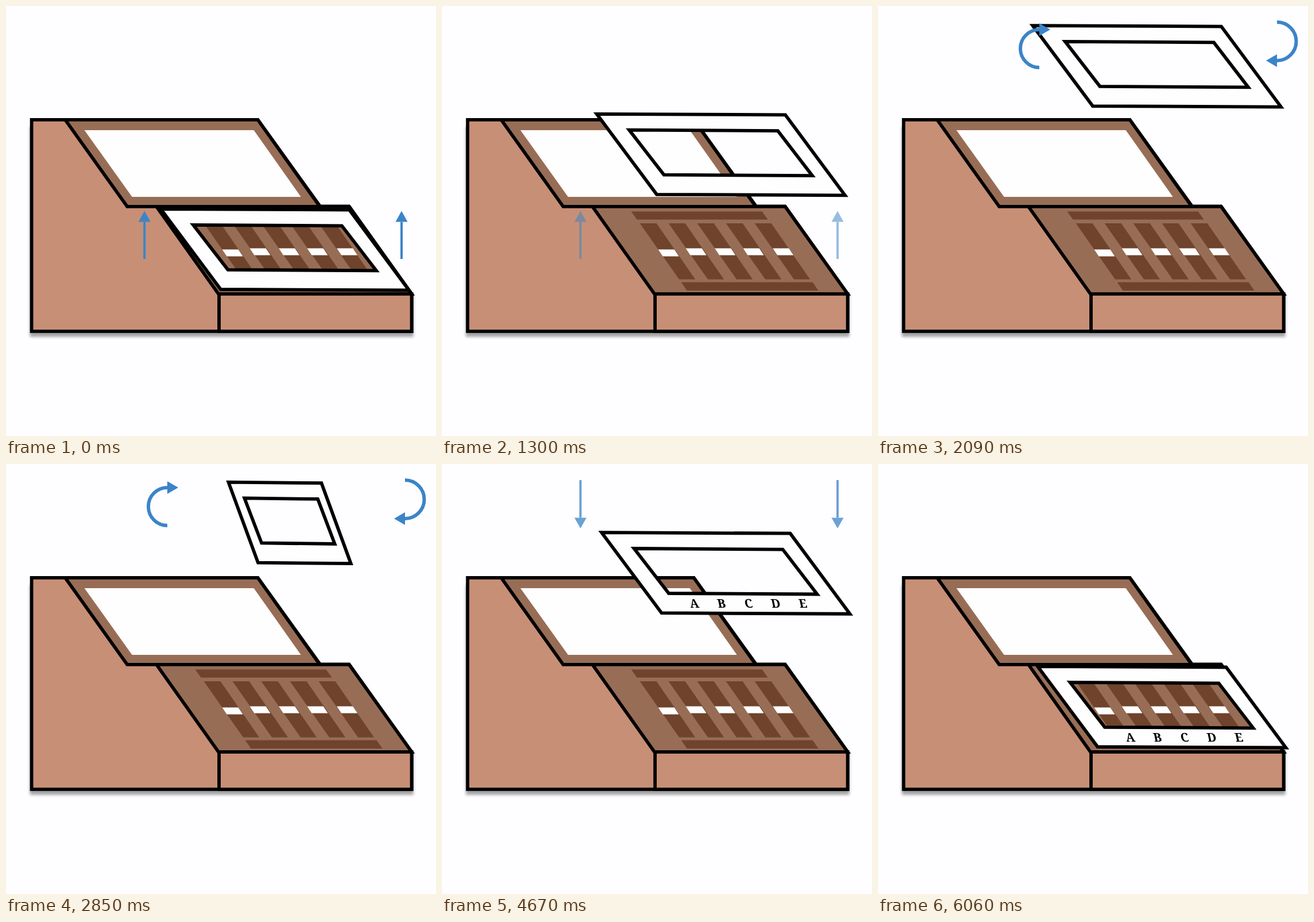
Animation, 749 px wide and 748 px high, one loop 6120 ms. Source, as an HTML page:

```html
<!DOCTYPE html>
<html lang="en">
<head>
<meta charset="utf-8">
<title>Reversible keyboard frame</title>
<style>
  html, body { margin: 0; width: 100%; height: 100%; overflow: hidden; background: #fefdff; }
  svg { display: block; width: 100vw; height: 100vh; }
  .line { stroke: #000; stroke-width: 5.8; stroke-miterlimit: 10; }
  .arrow path { fill: none; stroke: #3b84c8; }
  .arrow polygon { fill: #3b84c8; }
  text { font: bold 21px "Noto Serif", serif; text-anchor: middle; }
</style>
</head>
<body>
<svg viewBox="0 0 749 748" preserveAspectRatio="none">
  <defs>
    <filter id="soft" x="-5%" y="-5%" width="110%" height="115%"><feGaussianBlur stdDeviation="2.5"/></filter>
  </defs>
  <rect width="749" height="748" fill="#fefdff"/>
  <g transform="translate(-.4 .4)">
    <path d="M42 210H120L371 501H710V575H42Z" fill="#000" opacity=".36" filter="url(#soft)"/>
    <path class="line" fill="#c78f76" d="M45 197.500H439L547.500 348H598L707 500.500V565.500H45Z"/>
    <path class="line" fill="#986d56" d="M103.500 197.500H439L547 348.500H211.500Z"/>
    <path fill="#fefefe" d="M137 215.500H432L514 331.500H220Z"/>
    <path class="line" fill="#986d56" d="M262.500 348.500H598L707 500.500H370.500Z"/>
    <path fill="#6f432c" d="M330 357H558L568 371H340ZM417 480H646L656 494.500H427Z"/>
    <g id="slots"></g>
    <path class="line" fill="#c78f76" d="M371.500 500.500H707V565.500H371.500Z"/>
  </g>
  <g id="frame">
    <path id="panel" class="line" fill="#fefefe" fill-rule="evenodd"/>
    <g id="letters"></g>
  </g>
  <g id="lift" class="arrow"></g>
  <g id="turn" class="arrow">
    <path stroke-width="6" d="M281 107A33 33 0 0 1 281 41"/>
    <polygon points="281,30 281,52 300,41"/>
    <path stroke-width="6" d="M695 28A33.500 33.500 0 0 1 695 95"/>
    <polygon points="695,84 695,106 676,95"/>
  </g>
  <g id="drop" class="arrow"></g>
</svg>
<script>
const LOOP = 6120, FLIP_START = 2300, FLIP_END = 3700;
const CENTER = 485.5, SHIFT = 8.5;
const OUTER = [[269.5, 353], [598, 354.5], [702, 494.5], [374, 493]];
const INNER = [[326, 380.8], [585, 382.3], [645, 460.3], [386.5, 458.8]];

// [time, vertical offset of the frame]
const HEIGHTS = [
  [330, 0], [640, -16], [940, -77], [1270, -157], [1670, -265], [1910, -299], [2150, -321],
  [3950, -322], [4330, -294], [4670, -234], [5090, -126], [5270, -89], [5760, -5], [5880, -1]
];

const $ = id => document.getElementById(id);
const clamp = v => Math.max(0, Math.min(1, v));
const progress = (t, a, b) => clamp((t - a) / (b - a));
const ease = u => (1 - Math.cos(Math.PI * u)) / 2;

function slope(i) {
  const a = HEIGHTS[i - 1], b = HEIGHTS[i], c = HEIGHTS[i + 1];
  if (!a || !c || Math.abs(a[1] - b[1]) < 2 || Math.abs(b[1] - c[1]) < 2) return 0;
  return (c[1] - a[1]) / (c[0] - a[0]);
}

function heightAt(t) {
  const i = HEIGHTS.findIndex(k => k[0] > t);
  if (i < 0) return HEIGHTS[HEIGHTS.length - 1][1];
  if (i === 0) return HEIGHTS[0][1];
  const [t0, y0] = HEIGHTS[i - 1], [t1, y1] = HEIGHTS[i];
  const d = t1 - t0, u = (t - t0) / d, v = 1 - u;
  return v * v * ((1 + 2 * u) * y0 + u * d * slope(i - 1))
       + u * u * ((3 - 2 * u) * y1 - v * d * slope(i));
}

const straightArrow = (x, tail, neck, tip) =>
  `<path stroke-width="4" d="M${x} ${tail}V${neck}"/>` +
  `<polygon points="${x - 10.5},${neck} ${x + 10.5},${neck} ${x},${tip}"/>`;
const arrowPair = (...ys) => [241.2, 689].map(x => straightArrow(x, ...ys)).join("");

$("lift").innerHTML = arrowPair(440, 375.5, 356.5);
$("drop").innerHTML = arrowPair(28, 93.5, 112);

const slot = i => `<path fill="#6f432c" d="M${345 + 50 * i} 377.500h29l67.500 97.500h-28Z"/>`;
const mark = (x, i) =>
  `<path fill="#fefefe" d="M${x} ${i ? 421 : 423}h28l8 12h-28Z"/>`;
$("slots").innerHTML = [0, 1, 2, 3, 4].map(slot).join("") + [377, 425, 475.5, 525, 576.5].map(mark).join("");

$("letters").innerHTML = [..."ABCDE"].map((c, i) =>
  `<text transform="translate(${441 + 47.3 * i - CENTER - SHIFT} 483.500) skewX(12)">${c}</text>`).join("");

function outline(points, scale, center) {
  return "M" + points.map(([x, y]) => `${center + (x - CENTER) * scale} ${y}`).join("L") + "Z";
}

function setArrow(id, t, from, fadeStart, fadeEnd) {
  $(id).setAttribute("opacity", t < from ? 0 : 1 - progress(t, fadeStart, fadeEnd));
}

function draw(t) {
  const u = progress(t, FLIP_START, FLIP_END);
  const turned = ease(u);
  const scale = Math.max(0.005, Math.abs(Math.cos(Math.PI * turned)));
  const center = CENTER + SHIFT * clamp(u * 3);
  $("frame").setAttribute("transform", `translate(0 ${heightAt(t)})`);
  $("panel").setAttribute("d", outline(OUTER, scale, center) + outline(INNER, scale, center));
  $("letters").setAttribute("transform", `translate(${center} 0) scale(${scale} 1)`);
  $("letters").setAttribute("visibility", turned > 0.5 ? "visible" : "hidden");
  setArrow("lift", t, 0, 780, 1880);
  setArrow("turn", t, 2060, 2880, 3860);
  setArrow("drop", t, 3870, 4340, 5660);
}

const start = performance.now();
function tick() {
  draw((performance.now() - start) % LOOP);
  requestAnimationFrame(tick);
}
tick();
</script>
</body>
</html>
```
